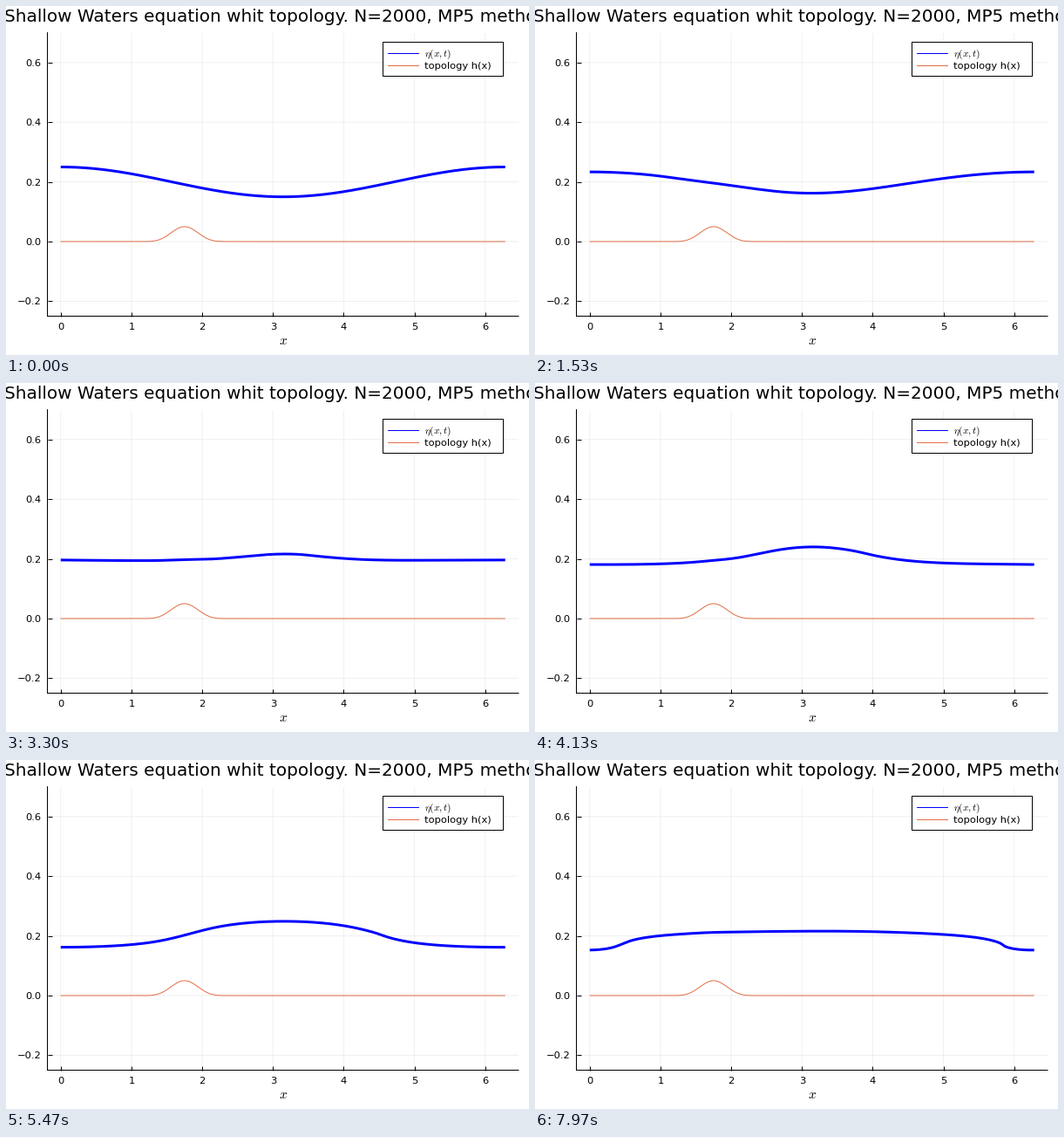
Write a matplotlib script that moves like this. It is 600 by 400 pixels and loops after 8000 ms.

```python
import numpy as np
import matplotlib.pyplot as plt
from matplotlib.animation import FuncAnimation
from matplotlib.patches import Rectangle

W, H, DPI = 600, 400, 100
LOOP, FRAMES = 8000, 240
LEFT, RIGHT, TOP, BOTTOM = 47.5, 588, 30.6, 355.5
BLUE, ORANGE = "#0000ff", "#e26f46"
PX = 72 / DPI  # one pixel in points
SMALL, LARGE = 8.25, 14.45

# Shallow water over a bump, periodic and pseudo-spectral, g = 1
N = 512
STEP, SUBSTEPS = 0.0389, 4
COUPLING = 0.5
x = np.linspace(0, 2 * np.pi, N, endpoint=False)
k = np.arange(N // 2 + 1)
ddx = 1j * k * (k < N // 3)
bed = 0.05 * np.clip(1 - ((x - 1.75) / 0.75) ** 2, 0, None) ** 8


def slope(f):
    return np.fft.irfft(ddx * np.fft.rfft(f), N)


def rate(state):
    eta, u = state
    depth = eta + COUPLING * bed
    return -np.array([slope(depth * u), slope(u * u / 2 + eta)])


def rk4(s, dt):
    a = rate(s)
    b = rate(s + dt / 2 * a)
    c = rate(s + dt / 2 * b)
    d = rate(s + dt * c)
    return s + dt / 6 * (a + 2 * b + 2 * c + d)


def solve():
    state = np.array([0.2 + 0.05 * np.cos(x), 0 * x])
    surface = []
    for _ in range(FRAMES):
        surface.append(state[0])
        for _ in range(SUBSTEPS):
            state = rk4(state, STEP / SUBSTEPS)
    return surface


def closed(f):
    return np.append(f, f[0])


surface = solve()
xs = np.append(x, 2 * np.pi)

plt.rcParams.update({"font.family": "DejaVu Sans", "mathtext.fontset": "cm"})
fig = plt.figure(figsize=(W / DPI, H / DPI), dpi=DPI, facecolor="white")


def label(px, py, text, size=SMALL, ha="center"):
    fig.text(px / W, 1 - py / H, text, size=size, ha=ha, va="baseline")


def stroke(x0, x1, y, color):
    fig.add_artist(plt.Line2D([x0 / W, x1 / W], [1 - y / H] * 2, color=color,
                              lw=PX, solid_capstyle="butt", snap=False))


ax = fig.add_axes([LEFT / W, 1 - BOTTOM / H,
                   (RIGHT - LEFT) / W, (BOTTOM - TOP) / H])
pad = 0.03 * 2 * np.pi
ax.set_xlim(-pad, 2 * np.pi + pad)
ax.set_ylim(-0.25, 0.7)
ax.set_xticks(range(7))
ax.set_yticks([-0.2, 0, 0.2, 0.4, 0.6])
ax.tick_params(direction="in", length=5 * PX, width=PX,
               labelbottom=False, labelleft=False)
ax.grid(color="black", alpha=0.06, lw=PX)
ax.set_axisbelow(True)
for tick in ax.xaxis.get_major_ticks() + ax.yaxis.get_major_ticks():
    tick.gridline.set_snap(False)
    tick.tick1line.set_snap(False)
for side in ("top", "right"):
    ax.spines[side].set_visible(False)
for side in ("left", "bottom"):
    ax.spines[side].set_linewidth(PX)
    ax.spines[side].set_snap(False)

for v in range(7):
    label(LEFT + (v + pad) / (2 * np.pi + 2 * pad) * (RIGHT - LEFT), 371, str(v))
for v in (-0.2, 0, 0.2, 0.4, 0.6):
    y = BOTTOM - (v + 0.25) / 0.95 * (BOTTOM - TOP)
    label(40, y + 4, f"{v:.1f}".replace("-", "\u2212"), ha="right")

label(-2, 18, "Shallow Waters equation whit topology. N=2000, MP5 method",
      LARGE, "left")
label((LEFT + RIGHT) / 2, 388, "$x$", 11)

wave, = ax.plot(xs, closed(surface[0]), color=BLUE, lw=3 * PX,
                solid_capstyle="butt")
ax.plot(xs, closed(bed), color=ORANGE, lw=PX, solid_capstyle="butt")

fig.add_artist(Rectangle((432.5 / W, 1 - 80.5 / H), 138 / W, 39 / H,
                         fc="white", ec="black", lw=PX, snap=False))
stroke(438, 474, 54.5, BLUE)
stroke(438, 474, 68.5, ORANGE)
label(480, 58, r"$\eta(x,t)$", SMALL, "left")
label(480, 72, "topology h(x)", SMALL, "left")


def draw(i):
    wave.set_ydata(closed(surface[i]))
    return wave,


anim = FuncAnimation(fig, draw, frames=FRAMES, interval=LOOP / FRAMES,
                     repeat=True, repeat_delay=0, blit=False)
plt.show()
```
